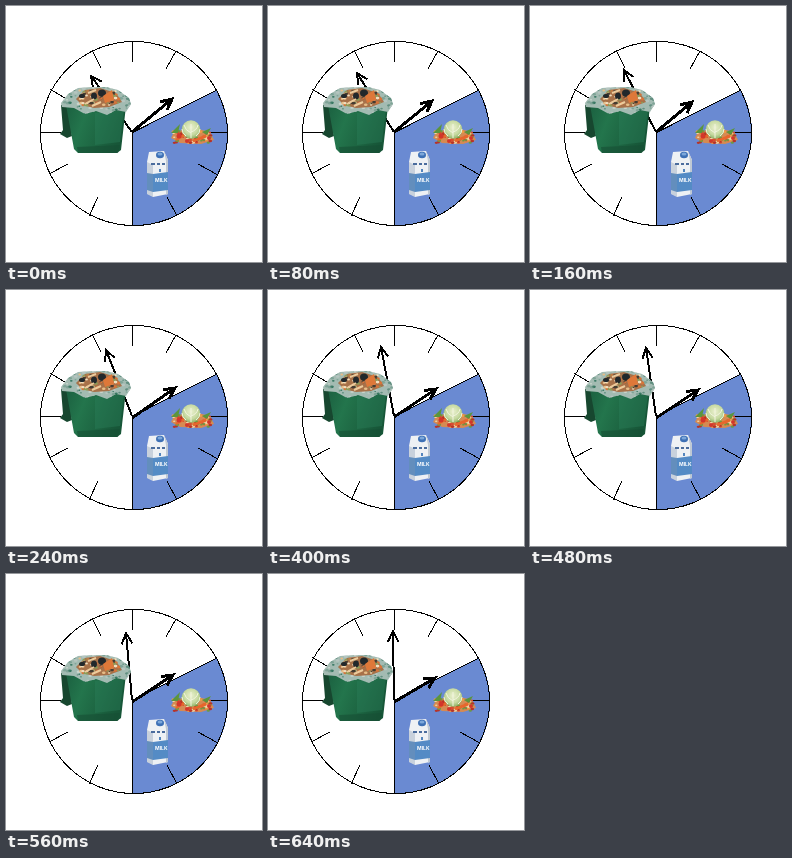
An HTML page for the animation above (720 ms loop, 256 by 256 pixels).

```html
<!DOCTYPE html>
<html lang="en">
<head>
<meta charset="utf-8">
<title>Food waste clock</title>
<style>
  html, body { margin: 0; width: 100%; height: 100%; overflow: hidden; background: #fff; }
  svg { display: block; width: 100vw; height: 100vh; }
  .line { fill: none; stroke: #000; shape-rendering: crispEdges; }
</style>
</head>
<body>
<svg viewBox="0 0 256 256">
  <defs>
    <linearGradient id="green" x1="0" x2="1" y1="0" y2=".3">
      <stop offset="0" stop-color="#1b6040"/>
      <stop offset=".35" stop-color="#23754c"/>
      <stop offset="1" stop-color="#175638"/>
    </linearGradient>
    <radialGradient id="leaf" cx=".5" cy=".4" r=".6">
      <stop offset="0" stop-color="#eaf0cf"/>
      <stop offset=".65" stop-color="#c6d9a0"/>
      <stop offset="1" stop-color="#8db267"/>
    </radialGradient>
    <clipPath id="rim"><path d="M55 97 62 88 72 82 86 81 100 81 112 84 123 92 125 98 120 106 110 104 101 109 90 105 79 108 68 102 56 101Z"/></clipPath>
  </defs>

  <path d="M126.5 126.5 211 84A93.5 92 0 0 1 126.5 219.5Z" fill="#6a8ad2" shape-rendering="crispEdges"/>
  <ellipse class="line" cx="128" cy="127.5" rx="93.5" ry="92"/>
  <path class="line" d="M126.5 36V56M170 45 160 63M126.5 126.5 211 84M202 126.5H221M192 158 212 169M161 191 171 210M126.5 126.5V219M92 191 83 210M62 158 43 168M35 126.5H55M44 83 62 94M86 44 95 62"/>

  <path id="hour" class="line" stroke-width="3"/>
  <path id="minute" class="line" stroke-width="2"/>

  <g id="bin">
    <path d="M55 99 62 96 66 130 61 132 54 128 57 124Z" fill="#17472f"/>
    <path d="M60 99 90 104 120 100 115 144 111 147H72L68 143Z" fill="url(#green)"/>
    <path d="M89 107 118 104 114 136 89 139Z" fill="#2c805a" opacity=".4"/>
    <path d="M71 141 114 139 112 147H72Z" fill="#174f35" opacity=".6"/>
    <g clip-path="url(#rim)">
      <rect x="54" y="80" width="72" height="30" fill="#a3bbb2"/>
      <g id="bag"></g>
      <path d="M70 93 79 84 94 82 110 87 116 96 103 101 88 102 76 99Z" fill="#a77149"/>
      <g id="scraps"></g>
    </g>
    <g fill="#22282b">
      <ellipse cx="96" cy="87" rx="4" ry="3.5"/>
      <ellipse cx="88" cy="90" rx="3" ry="3.5"/>
      <ellipse cx="76" cy="90" rx="3" ry="2"/>
    </g>
    <path d="M97 90 106 84 108 94 99 97Z" fill="#de7839"/>
    <path d="M79 98 88 93M86 100 95 96M82 87 90 84" stroke="#eccb9c" stroke-width="2"/>
  </g>

  <g id="veg">
    <path d="M165 132 168 126 177 124 192 123 204 126 208 134 195 138 174 137Z" fill="#d58a53"/>
    <g id="salad"></g>
    <path d="M165 127 174 118 172 127ZM196 126 205 122 201 129Z" fill="#5b953d"/>
    <circle cx="185" cy="123.5" r="9.3" fill="url(#leaf)"/>
    <path d="M185 132V118M185 127Q179 124 178 119M185 126Q191 124 192 119M180 130Q176 127 176 123M190 130Q194 127 194 123" fill="none" stroke="#f2f5df" stroke-width="1"/>
    <path d="M187 135 200 130M170 134 178 129" stroke="#e8662b" stroke-width="2.5"/>
    <g fill="#d2362b"><circle cx="173" cy="130" r="2.5"/><circle cx="181" cy="135" r="2"/><circle cx="203" cy="132" r="2"/></g>
  </g>

  <g id="milk">
    <path d="M143 146 158 145 162 154V188L147 191 141 188V156Z" fill="#eef1f4"/>
    <path d="M158 145 162 154V188L160 189V155Z" fill="#bfc9d4"/>
    <path d="M141 167 147 168 162 166V184L147 186 141 184Z" fill="#548bc5"/>
    <path d="M141 156 147 159V191L141 188Z" fill="#8296af" opacity=".35"/>
    <ellipse cx="154" cy="149" rx="4" ry="3.3" fill="#3d70b5"/>
    <ellipse cx="154" cy="148" rx="2.5" ry="1.5" fill="#7ca7da"/>
    <path d="M145 158h4m2 0h3m2 0h3" stroke="#4a6c9d" stroke-width="2"/>
    <path d="M154 163v3" stroke="#5385bd" stroke-width="2"/>
    <text x="149" y="176" fill="#fff" font-family="Inter, sans-serif" font-size="5" font-weight="700">MILK</text>
  </g>
</svg>
<script>
const STEP = 80;
// minute tip x, y; hour tip x, y; pivot y
const poses = [
  [85, 70, 166, 93, 126],
  [89, 67, 164, 95, 126],
  [94, 64, 162, 96, 126],
  [100, 60, 169, 98, 128],
  [106, 58, 169, 98, 128],
  [113, 57, 168, 99, 127],
  [116, 58, 168, 100, 128],
  [120, 59, 167, 101, 128],
  [125, 57, 167, 104, 128]
];
const byId = id => document.getElementById(id);

let seed = 17;
const random = () => (seed = seed * 16807 % 2147483647) / 2147483647;

function scatter(id, count, x, y, w, h, colors) {
  let marks = "";
  for (let i = 0; i < count; i++) {
    const px = x + random() * w, py = y + random() * h;
    const rx = 0.8 + random() * 1.3, color = colors[i % colors.length];
    marks += `<ellipse cx="${px}" cy="${py}" rx="${rx}" ry="${rx * 0.7}" fill="${color}"/>`;
  }
  byId(id).innerHTML = marks;
}
scatter("bag", 110, 55, 81, 70, 27, ["#618f80", "#cad5cd", "#7fa497", "#b6c5c0", "#397963"]);
scatter("scraps", 65, 73, 84, 40, 16, ["#e7bd87", "#d8743a", "#453b31", "#f0dfc0", "#8e9c58"]);
scatter("salad", 55, 166, 125, 40, 12, ["#d94a30", "#ef9a45", "#6c9a42", "#f0d6a5", "#b73327"]);

function arrow(x0, y0, x, y, size, spread) {
  const angle = Math.atan2(y - y0, x - x0);
  const barb = turn => `${x - size * Math.cos(angle + turn)} ${y - size * Math.sin(angle + turn)}`;
  return `M${x0} ${y0}L${x} ${y}M${barb(spread)}L${x} ${y}L${barb(-spread)}`;
}

function draw(now) {
  const [mx, my, hx, hy, py] = poses[Math.floor(now / STEP) % poses.length];
  byId("minute").setAttribute("d", arrow(126, 126, mx, my, 12, 0.46));
  byId("hour").setAttribute("d", arrow(126, py, hx, hy, 12, 0.46));
}

const start = performance.now();
function tick() {
  draw(performance.now() - start);
  requestAnimationFrame(tick);
}
tick();
</script>
</body>
</html>
```
